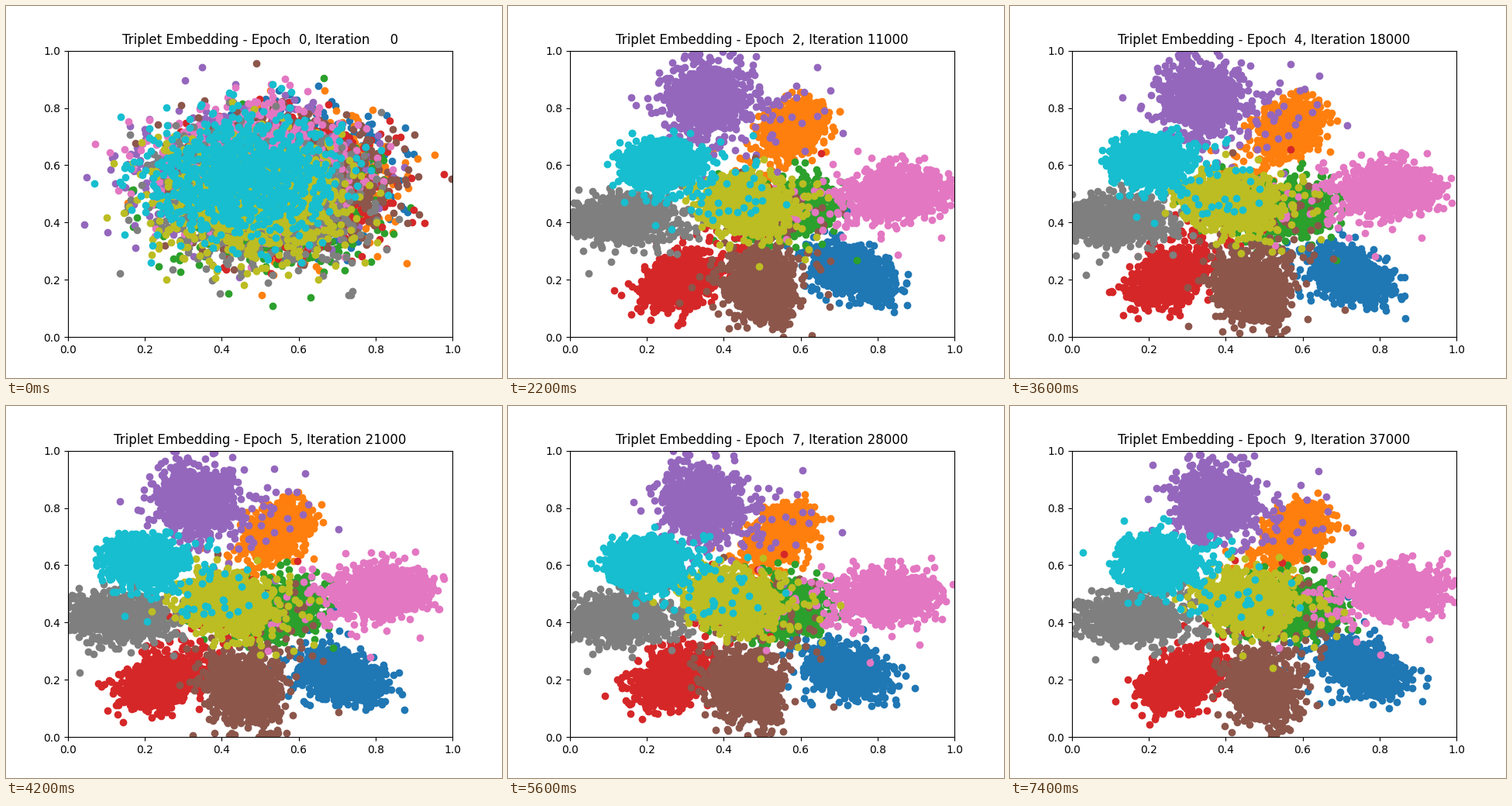
A matplotlib script for the animation above (8000 ms loop, 640 by 480 pixels).

```python
import numpy as np
import matplotlib.pyplot as plt
from matplotlib.animation import FuncAnimation

POINTS = 1000
LAST, FRAMES = 74, 80
STEP, EPOCH = 500, 3750

# Per class: home x, y; spread along and across; tilt in degrees;
# class it gets mixed up with; side of the first blob it lies on, in degrees
CLUSTERS = np.array([
    (.735, .235, .056, .034, -33, 2, 35),
    (.570, .720, .044, .031, 58, 8, 0),
    (.575, .445, .050, .038, 25, 8, 300),
    (.275, .195, .054, .035, 43, 8, 5),
    (.345, .830, .055, .046, 90, 1, 150),
    (.480, .170, .056, .042, -68, 2, 15),
    (.840, .505, .058, .042, 5, 2, 110),
    (.140, .410, .058, .035, 0, 8, 260),
    (.435, .475, .055, .044, -30, 2, 250),
    (.215, .610, .046, .043, 0, 8, 150),
])
HOME, SPREAD = CLUSTERS[:, None, :2], CLUSTERS[:, None, 2:4]
RIVAL = CLUSTERS[:, 5].astype(int)
TILT, SIDE = np.radians(CLUSTERS[:, 4]), np.radians(CLUSTERS[:, 6])
CLASSES = len(CLUSTERS)

rng = np.random.default_rng(7)
shape = (CLASSES, POINTS, 1)
za, zb = rng.normal(size=(2, CLASSES, POINTS, 2))
rate = rng.uniform(0, .04, shape)
stray = (rng.random(shape) < .08) * rng.random(shape) ** 1.3
loose = 1 + .6 * (stray > 0) + .5 * (rng.random(shape) < .03)

offset = np.stack([np.cos(SIDE), np.sin(SIDE)], -1)[:, None]
BLOB = np.array([.51, .53]) + .06 * offset


def embedding(f):
    noise = np.random.default_rng(100 + f)
    z = za * np.cos(rate * f) + zb * np.sin(rate * f)

    # The whole map sways sideways while each cluster trembles
    center = HOME + noise.normal(0, .008, HOME.shape)
    center[..., 0] += .022 * np.cos(2 * np.pi * (f - 11) / 70)
    angle = TILT + noise.normal(0, .08, CLASSES)
    c, s = np.cos(angle), np.sin(angle)
    turn = np.array([[c, s], [-s, c]]).transpose(2, 0, 1)

    trained = center + (z * loose * SPREAD) @ turn
    trained += stray * (center[RIVAL] - center)
    trained += noise.normal(0, .005, trained.shape)

    # Training pulls the first blob apart within a few steps
    blob = BLOB + z * (.12, .105)
    xy = trained + (blob - trained) * np.exp(-f / .8)
    return 1 - np.abs(1 - np.abs(xy))


fig, ax = plt.subplots(figsize=(6.4, 4.8), dpi=100)
ax.set(xlim=(0, 1), ylim=(0, 1))
dots = [ax.plot([], [], "o", color=f"C{i}")[0] for i in range(CLASSES)]
# The second class has a much tighter first blob, hidden under the others
BLOB_CORE = BLOB[1]
title = ax.set_title("")


def update(frame):
    f = min(frame, LAST)
    for dot, xy in zip(dots, embedding(f)):
        dot.set_data(*xy.T)
    n = f * STEP
    title.set_text(f"Triplet Embedding - Epoch {n // EPOCH:2d}, Iteration {n:5d}")
    return [*dots, title]


anim = FuncAnimation(fig, update, frames=FRAMES, interval=100,
                     repeat=True, repeat_delay=0, blit=False)
plt.show()
```
